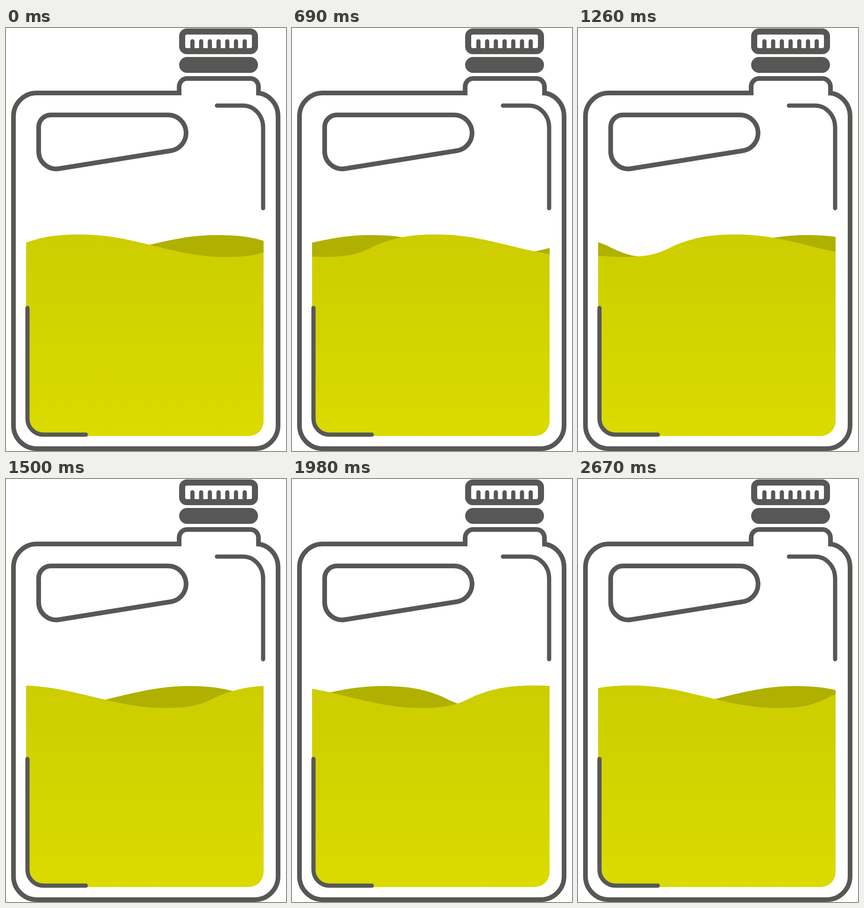
These frames come from a looping animation (600 px wide and 905 px high, 2.7 s). An HTML page:

```html
<!DOCTYPE html>
<html lang="en">
<head>
<meta charset="utf-8">
<title>Canister</title>
<style>
  html, body { margin: 0; width: 100%; height: 100%; overflow: hidden; background: #fff; }
  svg { display: block; width: 600px; height: 905px; }
  .line { fill: none; stroke: #575756; stroke-width: 10; }
  .shine { fill: none; stroke: #575756; stroke-width: 9; stroke-linecap: round; }
</style>
</head>
<body>
<svg viewBox="0 0 600 905">
  <defs>
    <linearGradient id="oil" gradientUnits="userSpaceOnUse" x1="0" y1="442" x2="0" y2="873">
      <stop offset="0" stop-color="#cdcd00"/>
      <stop offset="1" stop-color="#dbdb00"/>
    </linearGradient>
    <clipPath id="tank">
      <path d="M43 430H552V841A32 32 0 0 1 520 873H78A35 35 0 0 1 43 838Z"/>
    </clipPath>
  </defs>

  <g clip-path="url(#tank)">
    <g id="back"><path fill="#b0b000"/></g>
    <g id="front"><path fill="url(#oil)"/></g>
  </g>

  <g class="line">
    <path d="M376 139H66A50 50 0 0 0 16 189V850A50 50 0 0 0 66 900H533A50 50 0 0 0 583 850V189A47 50 0 0 0 536 139"/>
    <path d="M371 144V126A17 18 0 0 1 388 108H524A17 18 0 0 1 541 126V142"/>
    <path d="M96 186H348A38.5 38.5 0 0 1 353.5 262.5L113 301A37.5 37.5 0 0 1 70 264V212A26 26 0 0 1 96 186Z"/>
    <rect x="377.5" y="7.5" width="156" height="42" rx="10" stroke-width="13" style="stroke-width:13"/>
  </g>
  <rect x="371" y="62" width="169" height="34" rx="17" fill="#575756"/>
  <g class="shine">
    <path id="ticks"/>
    <path d="M452 166H508A43 47 0 0 1 551 213V385.5"/>
    <path d="M46 599V836A34 34 0 0 0 80 870H171"/>
  </g>
</svg>
<script>
  const LOOP = 2700, FRAMES = 90, PERIOD = 556;
  const CREST = 'c42 -16 70 -22.3 131 -22.3';
  const FALL = 'c113 0 197 48 310 48';
  const RISE = 'c55 0 75 -4.9 115 -25.7';

  // One wave layer: dir -1 mirrors the shape, step is the shift per frame.
  function wave(id, { x, y, dir, count, step }) {
    const layer = document.getElementById(id);
    const path = layer.firstElementChild;
    path.setAttribute('d', `M0 ${y}${(CREST + FALL + RISE).repeat(count)}V900H0Z`);
    path.setAttribute('transform', `translate(${x} 0) scale(${dir} 1)`);
    layer.animate(
      { transform: ['translateX(0px)', `translateX(${step * FRAMES}px)`] },
      { duration: LOOP, iterations: Infinity, easing: `steps(${FRAMES}, end)` }
    );
  }

  wave('back', { x: 581 + 3 * PERIOD, y: 465.4, dir: -1, count: 5, step: -12.35 });
  wave('front', { x: 30 - 5 * PERIOD, y: 464.1, dir: 1, count: 6, step: 30.75 });

  document.getElementById('ticks').setAttribute('d',
    Array.from({ length: 7 }, (_, i) => `M${399.5 + i * 18.67} 28.5V46`).join(''));
</script>
</body>
</html>
```
